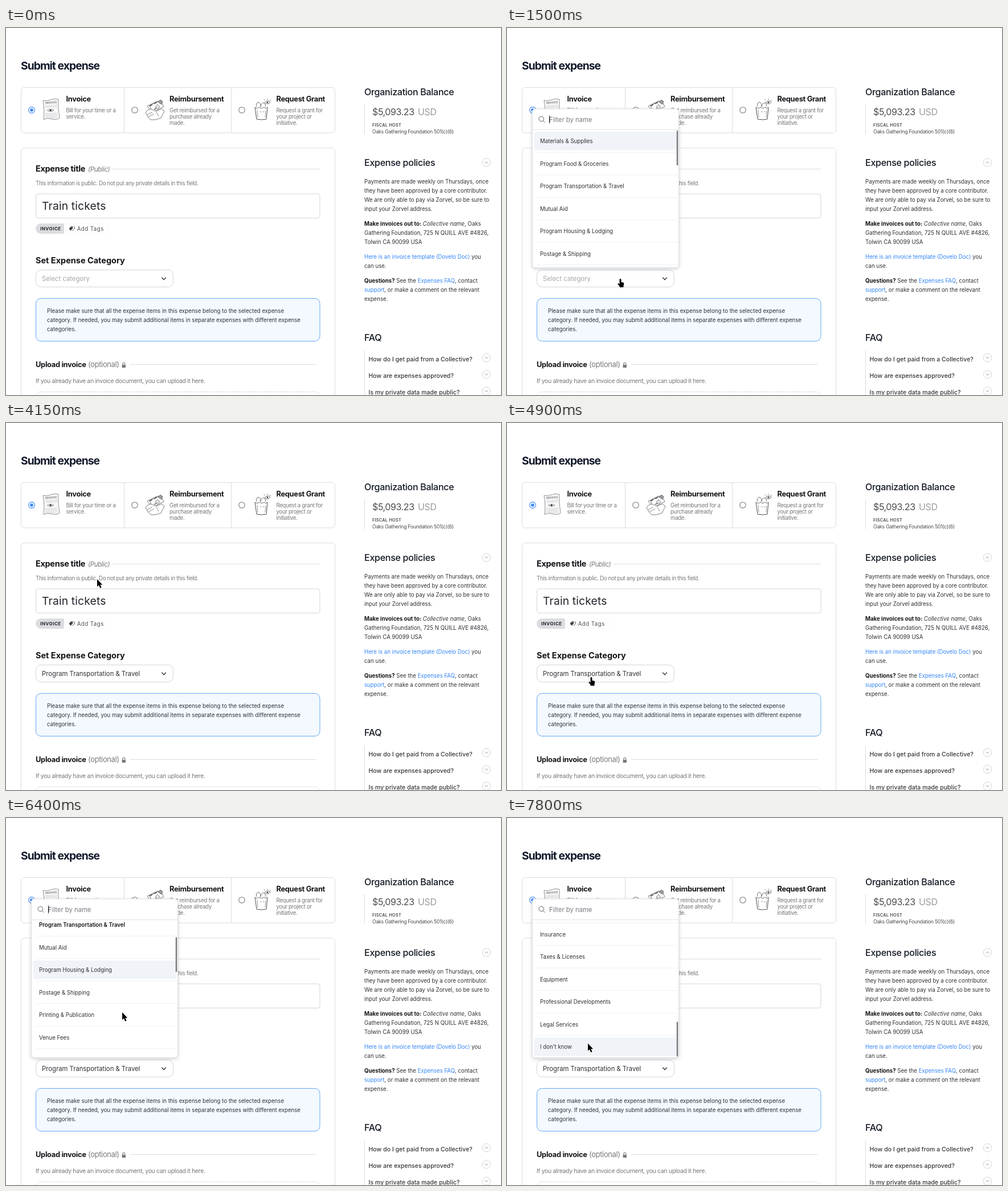
An HTML page with a canvas for the animation above (8 s loop, 869x644 px).

```html
<!DOCTYPE html>
<html lang="en">
<head>
<meta charset="utf-8">
<title>Submit expense</title>
<style>
html, body { margin: 0; width: 100%; height: 100%; overflow: hidden; background: #fff; }
canvas { display: block; }
</style>
</head>
<body>
<canvas id="stage" width="869" height="644"></canvas>
<script>
const ctx = document.getElementById('stage').getContext('2d');
const LOOP = 8000, STEP = 50;
const UNIT = 0.805;              // page zoom: CSS px to stage px
const TIGHT = -0.32;             // default tracking of form copy
const INK = '#141519', BODY = '#2d3036', GRAY = '#76777a', LINE = '#dadcdf', BLUE = '#3385f5';

const RUNS = [[0, 0], [500, 550], [700, 700], [850, 850], [1050, 1200], [1350, 1500], [2350, 3050],
  [3250, 3250], [3400, 3650], [3850, 3850], [4050, 4450], [4650, 4750], [4900, 4900], [5050, 5050],
  [5250, 5450], [5650, 6050], [6250, 6600], [6900, 7200], [7350, 7350], [7500, 7800]];

const POINTER = [[500, 300, 532], [850, 246, 482], [1200, 199, 440], [2300, 199, 440], [3050, 174, 252],
  [3400, 165.5, 236.5], [3650, 160, 274], [4150, 160, 274], [4450, 150, 438], [4750, 148, 446],
  [5600, 148, 446], [5900, 213, 384.5], [6050, 204, 341], [7450, 204, 341], [7800, 142, 395.5]];
const SCROLL = [[6200, 0], [6400, 90], [6600, 210], [6850, 210], [7200, 525], [7350, 547.5]];
const FADE = [[1300, 0], [1500, 1], [4050, 1], [4150, 0], [5200, 0], [5400, 1]];
const CARET = [[1350, 2350], [2650, 3250], [3850, 4200], [5250, 6050], [6250, 6900], [7350, 7700]];

const ITEMS = ['Materials & Supplies', 'Program Food & Groceries', 'Program Transportation & Travel',
  'Mutual Aid', 'Program Housing & Lodging', 'Postage & Shipping', 'Printing & Publication', 'Venue Fees',
  'Office Supplies', 'Marketing & Outreach', 'Contractors', 'Software & Hosting', 'Rent & Utilities',
  'Bank Fees', 'Insurance', 'Taxes & Licenses', 'Equipment', 'Professional Developments',
  'Legal Services', "I don't know"];
const PICK = 2, ROW = 39.5, MAX_SCROLL = 547.5;
const MENU = { x: 44.5, y: 142, w: 257, h: 278.5, top: 179 };

function snap(t) {
  const [a, b] = RUNS.filter(r => r[0] <= t).pop();
  return Math.min(b, a + Math.floor((t - a) / STEP) * STEP);
}

// Linear interpolation of column c over rows [time, ...values]
function track(keys, t, c = 1) {
  if (t <= keys[0][0]) return keys[0][c];
  for (let i = 1; i < keys.length; i++) {
    const a = keys[i - 1], b = keys[i];
    if (t <= b[0]) return a[c] + (b[c] - a[c]) * (t - a[0]) / (b[0] - a[0]);
  }
  return keys[keys.length - 1][c];
}

// cy is the middle of the capitals; size is in CSS px. Returns the end x.
function text(s, x, cy, size, { color = BODY, weight = 400, gap = 0, italic = false } = {}) {
  const px = size * UNIT;
  ctx.font = `${italic ? 'italic ' : ''}${weight} ${px}px Inter, sans-serif`;
  ctx.letterSpacing = gap + 'px';
  ctx.fillStyle = color;
  ctx.fillText(s, x, cy + px * 0.364);
  return x + ctx.measureText(s).width;
}

// Runs of [string, style] on one line
function rich(parts, x, cy, size) {
  for (const [s, style] of parts) x = text(s, x, cy, size, style);
}

function box(x, y, w, h, r, stroke, fill) {
  ctx.beginPath();
  ctx.roundRect(x, y, w, h, r);
  if (fill) { ctx.fillStyle = fill; ctx.fill(); }
  if (stroke) { ctx.strokeStyle = stroke; ctx.lineWidth = 1; ctx.stroke(); }
}

function line(x1, y1, x2, y2, color = LINE, width = 1) {
  ctx.beginPath();
  ctx.moveTo(x1, y1);
  ctx.lineTo(x2, y2);
  ctx.strokeStyle = color;
  ctx.lineWidth = width;
  ctx.stroke();
}

function ring(x, y, r, color, width = 1) {
  ctx.beginPath();
  ctx.arc(x, y, r, 0, Math.PI * 2);
  ctx.strokeStyle = color;
  ctx.lineWidth = width;
  ctx.stroke();
}

function dot(x, y, r, color) {
  ctx.beginPath();
  ctx.arc(x, y, r, 0, Math.PI * 2);
  ctx.fillStyle = color;
  ctx.fill();
}

function path(d, stroke, width = 1, fill) {
  const p = new Path2D(d);
  if (fill) { ctx.fillStyle = fill; ctx.fill(p); }
  if (stroke) { ctx.strokeStyle = stroke; ctx.lineWidth = width; ctx.stroke(p); }
}

function chevron(x, y, w, h, color, width) {
  path(`M${x - w} ${y - h}L${x} ${y + h}L${x + w} ${y - h}`, color, width);
}

function toggle(y, dir) {
  ring(843.5, y, 7.2, '#d3d5d9');
  chevron(843.5, y, 2.8, 1.4 * dir, '#85878b', 0.9);
}

function drawInvoice() {
  path('M65 127Q72 129 78 126T92 125Q91 140 94 158Q88 162 80 159.500T66 160.500Q68 145 65 127Z', '#77797c', 0.8, '#f7f7f8');
  ctx.save();
  ctx.translate(69, 131.5);
  ctx.rotate(-0.08);
  text('INVOICE', 0, 0, 6.2, { color: '#55575a', weight: 500 });
  ctx.restore();
  for (const y of [136, 138.5, 150, 152.5, 155, 157.5]) line(69, y + 0.6, 90, y - 0.6, '#b9bbbe', 0.6);
  path('M72.500 144.500Q78 140.500 84 144.500Q78 148 72.500 144.500Z', '#55575a', 0.7, '#fff');
  dot(78.2, 144.4, 1.6, '#333');
}

function drawMoney() {
  const ink = '#5a5c60';
  path('M248 137L266 128L273 133L254 145Z', ink, 0.8, '#fff');
  path('M252 136L271 127L277 138L257 148Z', ink, 0.8, '#fff');
  path('M252 137L257 134.500M260 133L265 130.500M260 143L264 141', '#333', 1.3);
  path('M262 139L266 134L270 138L267 142Z', ink, 0.7, '#e4e5e7');
  path('M267 130L271 126L275 129L273 134Z', ink, 0.8, '#9a9ca0');
  path('M245 148Q248 143 254 142L263 146L273 142L278 146L272 158L262 161L254 161L249 156Z', ink, 0.8, '#fff');
  path('M248 152L257 147.500M250 156L260 150.500M264 147L268 155', ink, 0.7);
}

function drawBasket() {
  const ink = '#4a4c50';
  path('M437 139L440 160Q449 162 457 160L459 139', ink, 1, '#fff');
  path('M437 139L441 141L445 139L449 141L453 139L456 141L459 139', ink, 0.8);
  path('M440 138Q438 132 443 130Q447 131 447 138M447 138Q448 132 452 131Q456 133 456 138', ink, 0.8);
  path('M441 144L442 157M456 145L455 157', ink, 0.6);
  path('M454 131Q459 125 464 130Q460 136 454 131Z', ink, 0.8, '#fff');
  dot(459, 130.6, 1.5, ink);
  dot(447.5, 147, 0.7, ink);
  dot(452.5, 147, 0.7, ink);
  path('M454 127L453 125M459 126L459 124M463 128L465 126', ink, 0.7);
}

function drawTypes() {
  box(26.5, 104.5, 551, 79.5, 5, LINE);
  line(207.5, 104.5, 207.5, 184);
  line(395.5, 104.5, 395.5, 184);
  ring(45, 144, 5.4, '#3b86f7', 1.1);
  dot(45, 144, 2.8, '#3b86f7');
  ring(226, 144, 5.2, '#8a8c90', 1.3);
  ring(414, 144, 5.2, '#8a8c90', 1.3);
  drawInvoice();
  drawMoney();
  drawBasket();
  const cards = [
    [105.5, 'Invoice', 'Bill for your time or a', 'service.'],
    [287, 'Reimbursement', 'Get reimbursed for a', 'purchase already', 'made.'],
    [474.5, 'Request Grant', 'Request a grant for', 'your project or', 'initiative.']];
  for (const [x, title, ...rows] of cards) {
    text(title, x, 124.5, 16, { color: INK, weight: 700, gap: TIGHT });
    rows.forEach((s, i) => text(s, x, 144 + i * 11, 12, { color: GRAY, gap: TIGHT }));
  }
}

function drawForm(picked) {
  box(26.5, 210.5, 551, 460, 6, LINE);
  text('Expense title', 52, 247, 18, { color: INK, weight: 700, gap: TIGHT });
  text('(Public)', 144, 248, 14, { color: GRAY, italic: true, gap: TIGHT });
  line(187, 247.5, 551, 247.5);
  text('This information is public. Do not put any private details in this field.', 52, 272, 12,
    { color: GRAY, gap: TIGHT });
  box(52.5, 291, 498.5, 42.5, 4, '#d3d5d9', '#fff');
  text('Train tickets', 63, 312.3, 24, { color: '#20232a', gap: 0.13 });

  box(52, 343, 50, 18, [9, 2, 2, 9], null, '#dcdde0');
  text('INVOICE', 60, 352, 10, { color: '#25272b', weight: 700, gap: 0.48 });
  ctx.setLineDash([2, 2]);
  box(105.5, 343.5, 76, 17, [2, 9, 9, 2], '#f1f2f4');
  ctx.setLineDash([]);
  path('M110.500 352L114 348.300L117.500 348L117.300 351.500L113.500 355.800Z', null, 0, '#3d4044');
  path('M119 348.300L120.600 349.700L120.300 352L116.300 356', '#3d4044', 0.9);
  dot(115.9, 349.6, 0.7, '#fff');
  text('Add Tags', 124.7, 352.3, 12, { color: '#4b4d51', gap: 0.48 });

  text('Set Expense Category', 52, 408, 18, { color: INK, weight: 700 });
  box(52.5, 424.5, 241, 30, 9, '#d3d5d9', '#fff');
  text(picked ? ITEMS[PICK] : 'Select category', 63, 440, 14, { color: picked ? BODY : '#a3a6ab' });
  chevron(277, 439.7, 3.7, 2, '#33363b', 1.4);

  box(52.5, 474.5, 498.5, 75, 9, '#66a8f5', '#f3f9ff');
  ['Please make sure that all the expense items in this expense belong to the selected expense',
    'category. If needed, you may submit additional items in separate expenses with different expense',
    'categories.'].forEach((s, i) => text(s, 72, 496.5 + i * 16, 12));

  text('Upload invoice', 52, 590.5, 16, { color: INK, weight: 700, gap: TIGHT });
  text('(optional)', 144, 590.5, 16, { color: GRAY, gap: TIGHT });
  box(203.5, 591, 6.5, 5, 1, null, '#77797d');
  path('M204.800 591V589.500A2 2.200 0 0 1 208.800 589.500V591', '#77797d', 1.1);
  line(218, 590.5, 545, 590.5);
  text('If you already have an invoice document, you can upload it here.', 52, 619, 13,
    { color: GRAY, gap: TIGHT });
  ctx.setLineDash([2, 2]);
  box(52.5, 638.5, 498.5, 40, 8, '#c6c8cc');
  ctx.setLineDash([]);
}

function drawSide() {
  const x = 629, head = { color: '#141a24', weight: 500, gap: TIGHT };
  const bold = { weight: 700, color: INK }, link = { color: BLUE };
  text('Organization Balance', x, 112, 20, head);
  line(629.5, 134, 629.5, 186);
  text('$5,093.23', 643, 147, 20, { color: '#4a4c50', gap: -0.45 });
  text('USD', 723, 147, 20, { color: '#9b9da1', gap: -0.45 });
  text('FISCAL HOST', 643, 170.5, 9, { color: '#45474b', weight: 600, gap: 0.3 });
  text('Oaks Gathering Foundation 501(c)(6)', 643, 181.3, 11, { color: '#4a4c50', gap: TIGHT });

  text('Expense policies', x, 236, 20, head);
  toggle(236, -1);
  const rows = [
    [269.5, ['Payments are made weekly on Thursdays, once']],
    [285.5, ['they have been approved by a core contributor.']],
    [301.5, ['We are only able to pay via Zorvel, so be sure to']],
    [317.5, ['input your Zorvel address.']],
    [343.5, ['Make invoices out to:', bold], [' '], ['Collective name', { italic: true }], [', Oaks']],
    [359.5, ['Gathering Foundation, 725 N QUILL AVE #4826,']],
    [375.5, ['Tolwin CA 90099 USA']],
    [401.5, ['Here is an invoice template (Dovelo Doc)', link], [' you']],
    [417.5, ['can use.']],
    [443.5, ['Questions?', bold], [' See the '], ['Expenses FAQ', link], [', contact']],
    [459.5, ['support', link], [', or make a comment on the relevant']],
    [475.5, ['expense.']]];
  for (const [y, ...parts] of rows) rich(parts, x, y, 12);

  text('FAQ', x, 543, 20, head);
  line(629.5, 566, 629.5, 644);
  ['How do I get paid from a Collective?', 'How are expenses approved?', 'Is my private data made public?']
    .forEach((s, i) => {
      text(s, 636.5, 580.8 + i * 29.2, 13, { color: '#313438', weight: 500, gap: 0.07 });
      toggle(578.5 + i * 29.3, 1);
    });
}

function hoverRow(t, y) {
  if (y < MENU.top || y > MENU.y + MENU.h) return 0;
  // Hover lags behind the wheel until scrolling pauses
  const seen = t < 6600 ? 0 : t < 7350 ? 210 : MAX_SCROLL;
  return Math.floor((y - MENU.top + seen) / ROW);
}

function drawMenu(t, picked, py) {
  const alpha = track(FADE, t);
  if (alpha <= 0) return;
  const { x, y, w, h, top } = MENU, bottom = y + h, k = 0.95 + 0.05 * alpha;
  ctx.save();
  ctx.globalAlpha = alpha;
  ctx.translate(x + w / 2, bottom);
  ctx.scale(k, k);
  ctx.translate(-x - w / 2, -bottom);

  ctx.shadowColor = 'rgba(20, 25, 35, 0.22)';
  ctx.shadowBlur = 7;
  ctx.shadowOffsetY = 2;
  box(x, y, w, h, 5, null, '#fff');
  ctx.shadowColor = 'transparent';
  box(x, y, w, h, 5, '#dfe1e5');

  ring(60.3, 159.5, 4.3, '#5c5f65', 1);
  line(63.4, 162.7, 66.5, 166, '#5c5f65', 1);
  text('Filter by name', 74, 161, 14, { color: '#777a80' });
  if (CARET.some(([a, b]) => t >= a && t < b)) line(74.5, 153.5, 74.5, 167.5, '#202227', 1);
  line(x, 178.5, x + w, 178.5, '#e2e4e8');

  ctx.beginPath();
  ctx.rect(x, top, w, bottom - top - 0.5);
  ctx.clip();
  const scroll = track(SCROLL, t), active = hoverRow(t, py);
  ITEMS.forEach((name, i) => {
    const cy = top + 19.5 + i * ROW - scroll;
    const chosen = picked && i === PICK;
    if (i === active) box(48, cy - 16.5, 250, 32.5, 4, null, '#f0f3f7');
    if (i < ITEMS.length - 1) line(52, cy + 19.7, 300, cy + 19.7, '#eff0f3');
    text(name, 58, cy, 12, { weight: chosen ? 600 : 400, color: chosen ? INK : BODY });
  });
  box(297.8, 180 + scroll / MAX_SCROLL * 177.5, 2.4, 61, 1, null, '#75777b');
  ctx.restore();
}

function drawPointer(t, x, y) {
  if (t < 500) return;
  const hand = x > 52 && x < 294 && y > 424 && y < 455;
  ctx.save();
  ctx.translate(x, y);
  ctx.lineJoin = 'round';
  const d = hand
    ? 'M-1.500 1Q0 -1 1.400 1L1.600 6L5 6.500Q6.500 7 6.300 9L5.500 12.500V15H-1.500V13L-4.500 9.500Q-4.800 7.500 -3 8L-1.300 9.500Z'
    : 'M0 0V13.200L3 10.500L5.200 15.700L7.600 14.700L5.400 9.700H9.200Z';
  path(d, '#fff', 1.6);
  path(d, null, 0, '#000');
  ctx.restore();
}

function draw(t) {
  const picked = t >= 4100, x = track(POINTER, t, 1), y = track(POINTER, t, 2);
  ctx.fillStyle = '#fff';
  ctx.fillRect(0, 0, 869, 644);
  text('Submit expense', 26, 65.7, 24, { color: '#131a2b', weight: 700, gap: -0.97 });
  drawTypes();
  drawForm(picked);
  drawSide();
  drawMenu(t, picked, y);
  drawPointer(t, x, y);
}

const start = performance.now();
function tick() {
  draw(snap((performance.now() - start) % LOOP));
  requestAnimationFrame(tick);
}
tick();
</script>
</body>
</html>
```
